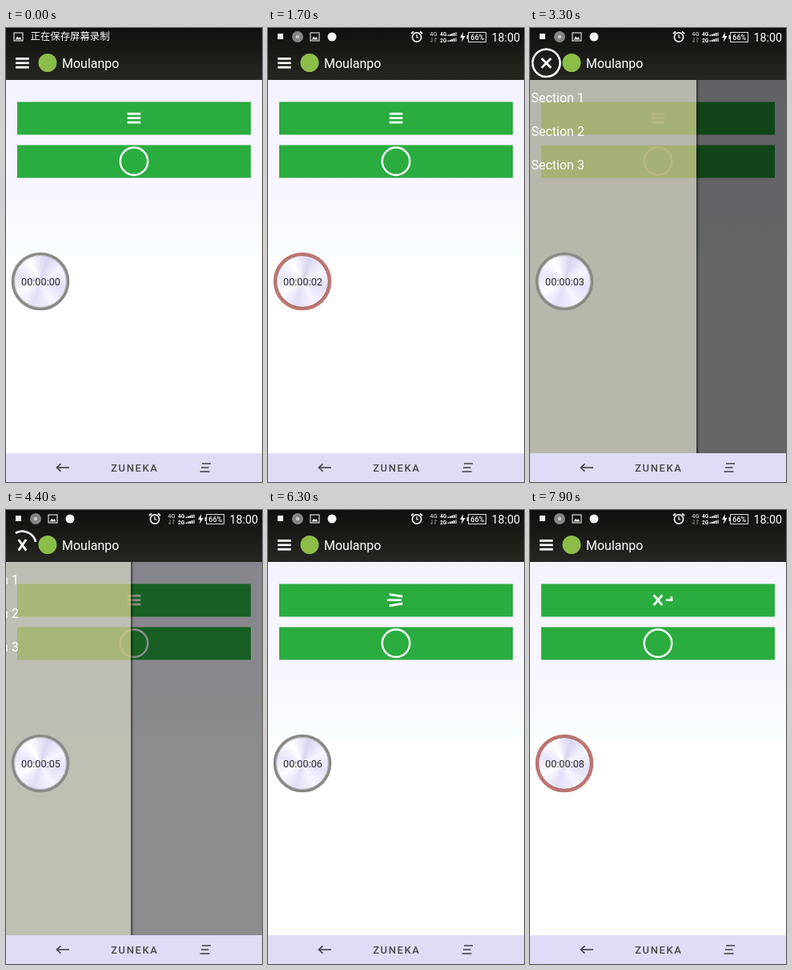
Recreate the animation shown at these times as an HTML page with a canvas. Size 320 by 568 pixels, loop 8000 ms.

```html
<!DOCTYPE html>
<html lang="en">
<head>
<meta charset="utf-8">
<title>Menu icon demo</title>
<style>
  html, body { margin: 0; width: 100%; height: 100%; overflow: hidden; background: #fff; }
  canvas { display: block; width: 320px; height: 568px; }
</style>
</head>
<body>
<canvas id="stage"></canvas>
<script>
const W = 320, H = 568, LOOP = 8000, STEP = 100;
const BAR_END = 65, NAV_TOP = 532, DRAWER_W = 208;
const BUTTON = { x: 14, w: 292, h: 41, tops: [92.5, 146.5] };
const GREEN = '#2aac3f', ICON_R = 17.2;
const FONT = 'Roboto, "Noto Sans CJK SC", "Noto Sans CJK", sans-serif';

const canvas = document.getElementById('stage');
const ctx = canvas.getContext('2d');
const ratio = window.devicePixelRatio || 1;
canvas.width = W * ratio;
canvas.height = H * ratio;
ctx.scale(ratio, ratio);

const clamp = (v) => Math.max(0, Math.min(1, v));
const ease = (v) => (1 - Math.cos(Math.PI * clamp(v))) / 2;
const ramp = (t, start, length) => ease((t - start) / length);

function rect(x, y, w, h, fill) {
  ctx.fillStyle = fill;
  ctx.fillRect(x, y, w, h);
}

function disc(x, y, r, fill) {
  ctx.fillStyle = fill;
  ctx.beginPath();
  ctx.arc(x, y, r, 0, Math.PI * 2);
  ctx.fill();
}

function ring(x, y, r, width, color) {
  ctx.strokeStyle = color;
  ctx.lineWidth = width;
  ctx.beginPath();
  ctx.arc(x, y, r, 0, Math.PI * 2);
  ctx.stroke();
}

function line(color, width, ...points) {
  ctx.strokeStyle = color;
  ctx.lineWidth = width;
  ctx.beginPath();
  for (let i = 0; i < points.length; i += 2) ctx.lineTo(points[i], points[i + 1]);
  ctx.stroke();
}

function text(str, x, y, size, color, align = 'left', weight = 400) {
  ctx.font = `${weight} ${size}px ${FONT}`;
  ctx.fillStyle = color;
  ctx.textAlign = align;
  ctx.fillText(str, x, y);
}

// Interpolates between [position, value] pairs.
function track(p, keys) {
  for (let i = 1; i < keys.length; i++) {
    const [a, va] = keys[i - 1], [b, vb] = keys[i];
    if (p <= b) return va + (vb - va) * (p - a) / (b - a);
  }
  return keys[keys.length - 1][1];
}

// Three bars at p = 0, a cross inside a circle at p = 1.
function menuIcon(x, y, p) {
  const angle = track(p, [[0, 0], [0.15, 9], [0.6, 50], [0.75, 55], [1, 45]]) * Math.PI / 180;
  const gap = track(p, [[0, 5.4], [0.15, 5.8], [0.55, 0], [1, 0]]);
  const half = 8.3;
  ctx.save();
  ctx.translate(x, y);
  for (const side of [-1, 1]) {
    const dx = Math.cos(angle) * half, dy = -side * Math.sin(angle) * half;
    line('#fff', 2.8, -dx, side * gap - dy, dx, side * gap + dy);
  }
  // The middle bar runs right, then winds counterclockwise round the circle.
  const tail = track(p, [[0, -8.3], [0.15, -11], [0.6, 10], [0.75, 21], [1, 21]]);
  const head = track(p, [[0, 8.3], [0.15, 7], [0.6, 22], [0.75, 53], [1, 21 + ICON_R * 2 * Math.PI]]);
  const turn = (s) => -Math.max(0, s - ICON_R) / ICON_R;
  ctx.lineWidth = 2.6;
  ctx.strokeStyle = '#fff';
  ctx.beginPath();
  if (tail < ICON_R) {
    ctx.moveTo(tail, 0);
    ctx.lineTo(Math.min(head, ICON_R), 0);
  }
  if (head > ICON_R) ctx.arc(0, 0, ICON_R, turn(tail), turn(head), true);
  ctx.stroke();
  ctx.restore();
}

function pictureIcon(x, y) {
  ctx.strokeStyle = '#ddd';
  ctx.lineWidth = 1.2;
  ctx.strokeRect(x - 5.5, y - 5, 11, 10);
  ctx.fillStyle = '#ddd';
  ctx.beginPath();
  for (const [dx, dy] of [[-4, 3.5], [-1.5, -0.5], [0.5, 1.5], [2, 0], [4, 3.5]]) ctx.lineTo(x + dx, y + dy);
  ctx.fill();
}

function alarmIcon(x, y) {
  ring(x, y + 0.5, 5.6, 1.6, '#fff');
  line('#fff', 1.2, x, y - 3, x, y + 1, x + 2.5, y + 1);
  line('#fff', 1.8, x - 7, y - 4, x - 4, y - 6.5);
  line('#fff', 1.8, x + 7, y - 4, x + 4, y - 6.5);
}

function signal(x, base) {
  for (let i = 0; i < 5; i++) rect(x + i * 2.4, base - 1.5 - i * 0.8, 1.7, 1.5 + i * 0.8, i < 4 ? '#fff' : '#aaa');
}

function statusIcons() {
  rect(12, 7, 7, 7, '#eee');
  disc(37, 11, 7, '#858585');
  disc(37, 11, 2.2, '#c9c9c9');
  pictureIcon(58.5, 11);
  disc(80, 11, 5.5, '#f4f4f4');
  alarmIcon(186, 11);
  text('4G', 207, 9.5, 7.5, '#fff', 'center');
  line('#888', 1, 205, 12, 205, 18, 203, 16);
  line('#888', 1, 209, 18, 209, 12, 211, 14);
  text('4G', 219, 10, 6.5, '#fff', 'center', 700);
  text('2G', 219, 17.5, 6.5, '#fff', 'center', 700);
  signal(224.5, 10);
  signal(224.5, 17);
  ctx.fillStyle = '#fff';
  ctx.beginPath();
  for (const [x, y] of [[244, 5], [240, 12], [243, 12], [241.5, 18], [246.5, 10], [243.5, 10]]) ctx.lineTo(x, y);
  ctx.fill();
  ctx.lineWidth = 1;
  ctx.strokeStyle = '#ddd';
  ctx.strokeRect(250.5, 5.5, 22, 12);
  rect(248.5, 9, 2, 5, '#ddd');
  text('66%', 261.7, 15, 9, '#fff', 'center', 500);
  text('18:00', 279.5, 16.5, 14.3, '#fff');
}

function statusBar(t) {
  const swap = ramp(t, 700, 400);
  ctx.save();
  ctx.beginPath();
  ctx.rect(0, 0, W, 22);
  ctx.clip();
  if (swap < 1) {
    ctx.globalAlpha = 1 - swap;
    pictureIcon(15.5, 11 - swap * 22);
    text('正在保存屏幕录制', 30.5, 15 - swap * 22, 12.4, '#fff');
  }
  ctx.globalAlpha = swap;
  if (swap > 0) statusIcons();
  ctx.restore();
}

function header(t, drawer) {
  const fill = ctx.createLinearGradient(0, 0, 0, BAR_END);
  fill.addColorStop(0, '#0f0f0d');
  fill.addColorStop(1, '#262622');
  rect(0, 0, W, BAR_END, fill);
  statusBar(t);
  menuIcon(20.4, 43.8, drawer);
  disc(52, 43.5, 11.5, '#8cbd49');
  text('Moulanpo', 70, 50, 16, '#fff');
}

function content(buttonP) {
  const fill = ctx.createLinearGradient(0, BAR_END, 0, 285);
  fill.addColorStop(0, '#f4f2fe');
  fill.addColorStop(0.75, '#f9f7ff');
  fill.addColorStop(1, '#f9feff');
  rect(0, 0, W, H, '#fff');
  rect(0, BAR_END, W, 220, fill);
  for (const top of BUTTON.tops) rect(BUTTON.x, top, BUTTON.w, BUTTON.h, GREEN);
  menuIcon(160, 112.7, buttonP);
  ring(160, 166.7, ICON_R, 2.5, '#fff');
}

function drawDrawer(p) {
  if (p <= 0) return;
  const right = DRAWER_W * p;
  rect(0, BAR_END, W, NAV_TOP - BAR_END, `rgba(0,0,0,${0.6 * p})`);
  const shade = ctx.createLinearGradient(right, 0, right + 4, 0);
  shade.addColorStop(0, 'rgba(0,0,0,.5)');
  shade.addColorStop(1, 'rgba(0,0,0,0)');
  rect(right, BAR_END, 4, NAV_TOP - BAR_END, shade);
  rect(0, BAR_END, right, NAV_TOP - BAR_END, 'rgba(204,204,190,.8)');
  // The buttons shine through the panel with a yellowish cast.
  ctx.globalCompositeOperation = 'multiply';
  for (const top of BUTTON.tops) rect(BUTTON.x, top, right - BUTTON.x, BUTTON.h, '#ffffbe');
  ctx.globalCompositeOperation = 'source-over';
  for (let i = 0; i < 3; i++) {
    text(`Section ${i + 1}`, right - DRAWER_W + 1.5, 92.5 + i * 42.3, 16, '#fff');
  }
}

function navBar() {
  const ink = '#4a4848';
  rect(0, NAV_TOP, W, H - NAV_TOP, '#dfdcf6');
  line(ink, 1.7, 79, 550, 64, 550);
  line(ink, 1.7, 68.5, 545.3, 63.5, 550, 68.5, 554.7);
  ctx.letterSpacing = '1.6px';
  text('ZUNEKA', 160.8, 554.7, 13, ink, 'center', 500);
  ctx.letterSpacing = '0px';
  line(ink, 1.6, 245, 545, 256, 545);
  line(ink, 1.6, 244, 550, 253.5, 550);
  line(ink, 1.6, 242.5, 555, 254.5, 555);
}

function recorder(t) {
  const x = 43, y = 317, clock = t / 1000 + 0.65;
  const red = clock % 1 >= 0.1 && clock % 1 < 0.6;
  const shine = ctx.createConicGradient(-0.5, x, y);
  const tones = ['#f6f4ff', '#e4e0f8', '#f6f5ff', '#e2def6', '#fcfcff', '#e8e5fa', '#ffffff', '#dad6f0', '#f6f4ff'];
  tones.forEach((tone, i) => shine.addColorStop(i / (tones.length - 1), tone));
  disc(x, y, 36, shine);
  ring(x, y, 34.5, 3.6, red ? '#bd7670' : '#8b8985');
  ring(x, y, 32.4, 1, red ? '#a04f48' : '#b9b6b3');
  const seconds = String(Math.floor(clock)).padStart(2, '0');
  text(`00:00:${seconds}`, x + 0.5, 322, 12.7, '#262626', 'center');
}

function render(now) {
  const t = Math.floor((now % LOOP) / STEP) * STEP;
  const drawer = ramp(t, 2300, 600) - ramp(t, 4200, 600);
  const button = ramp(t, 6100, 800) - ramp(t, 7550, 800);
  content(button);
  drawDrawer(drawer);
  header(t, drawer);
  navBar();
  recorder(t);
}

let origin = null;
function tick(now) {
  if (origin === null) origin = now;
  render(now - origin);
  requestAnimationFrame(tick);
}
requestAnimationFrame(tick);
</script>
</body>
</html>
```
